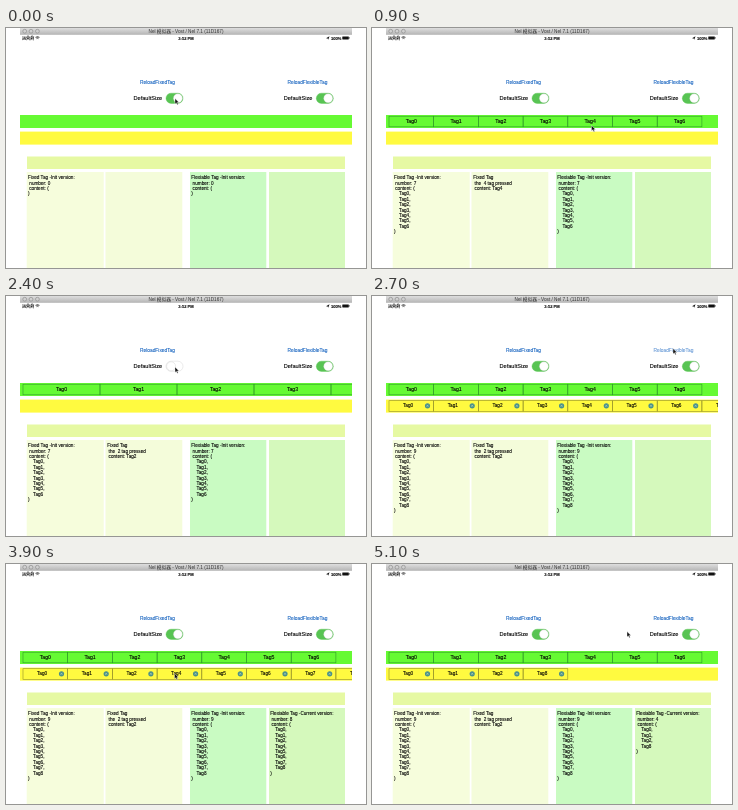
Write an HTML page that moves like this. It is 360 px wide and 240 px high and loops after 5.4 s.

```html
<!DOCTYPE html>
<html lang="zh">
<head>
<meta charset="utf-8">
<title>Tag demo</title>
<style>
html, body { margin: 0; width: 100%; height: 100%; overflow: hidden; background: #fff; }
svg { display: block; }
#stage { width: 360px; height: 240px; }
text { font-family: "Liberation Sans", "Noto Sans CJK SC", "Noto Sans CJK", sans-serif; white-space: pre; fill: #000; stroke: #000; stroke-width: .1px; }
</style>
</head>
<body>
<svg id="stage" viewBox="0 0 360 240" xmlns="http://www.w3.org/2000/svg">
  <defs>
    <linearGradient id="chrome" x2="0" y2="1">
      <stop offset="0" stop-color="#dedede"/>
      <stop offset="1" stop-color="#b4b4b4"/>
    </linearGradient>
  </defs>
  <g id="base"></g>
  <g id="live"></g>
  <g id="cursor">
    <path d="M0 0V5.4L1.3 4.3L2.2 6.3L3.2 5.9L2.3 3.9H4Z" fill="#111" stroke="#fff" stroke-width=".4"/>
  </g>
</svg>
<script>
const STEP = 300, STEPS = 18;
const NARROW = 44.7, WIDE = 77;
const byId = id => document.getElementById(id);

const rect = (x, y, w, h, fill, more = '') =>
  `<rect x="${x}" y="${y}" width="${w}" height="${h}" fill="${fill}" ${more}/>`;
const text = (x, y, size, str, more = '') =>
  `<text x="${x}" y="${y}" font-size="${size}" ${more}>${str}</text>`;
const MID = 'text-anchor="middle"';

// Pointer tip at each step
const pointer = [
  [169, 70.5], [152, 54], [190, 78], [219.5, 97.5], [169, 71], [187, 87],
  [199, 94.5], [150, 94.5], [169, 71], [301, 52.5], [310, 63], [315, 71],
  [240, 92], [168.5, 109.5], [168.5, 109.5], [168.5, 109.5], [168.5, 109.5], [255, 67.5]
];

function drawBase() {
  const lights = [18.7, 25, 31.4].map(x =>
    `<circle cx="${x}" cy="3.2" r="1.9" fill="#d0d0d0" stroke="#777" stroke-width=".5"/>`).join('');
  const wifi = [1, 2, 3].map(r =>
    `<path d="M${31.5 - r * .7} ${11.5 - r * .7}Q31.5 ${11.2 - r * 1.2} ${31.5 + r * .7} ${11.5 - r * .7}"
      fill="none" stroke="#111" stroke-width=".6"/>`).join('');
  byId('base').innerHTML =
    rect(14, 0, 332, 6.8, 'url(#chrome)') + lights +
    text(180, 4.6, 4.7, 'Nel 模拟器 - Vost / Nel 7.1 (11D167)', MID + ' style="fill:#333;stroke:none"') +
    text(16, 11.6, 4.1, '运营商') + wifi +
    text(180, 11.6, 4.1, '3:52 PM', MID + ' font-weight="bold"') +
    '<path d="M320 10.2L323.5 8.2L322.2 11.8L321.7 10.4Z" fill="#111"/>' +
    text(325, 11.6, 4.1, '100%', 'font-weight="bold"') +
    rect(336.3, 8.4, 6.5, 3, '#111', 'rx=".4"') + rect(343, 9.3, .6, 1.2, '#111') +
    rect(14, 87, 332, 13, '#66fa33') +
    rect(14, 103.6, 332, 13, '#fffa40') +
    rect(21, 128.5, 318, 12.5, '#e6f9a3') +
    rect(20.7, 144, 77, 96, '#f6fddc') +
    rect(99.5, 144, 76.8, 96, '#f4fcda') +
    rect(184, 144, 76.3, 96, '#c9fbc2') +
    rect(263, 144, 76, 96, '#d5f9bc') +
    text(127.5, 72, 5.6, 'DefaultSize') + text(277.7, 72, 5.6, 'DefaultSize');
}

// pos: 1 = on, 0 = off, 0.5 = held midway
function toggle(x, pos) {
  const held = pos === .5;
  const track = held ? '#a9c6aa' : pos ? '#58c453' : '#fff';
  const edge = pos === 0 ? '#ccc' : track;
  const w = held ? 11 : 9;
  const knobX = x + .6 + (15.8 - w) * pos;
  return rect(x, 65.2, 17, 10.2, track, `rx="5.1" stroke="${edge}" stroke-width=".4"`) +
    rect(knobX, 65.8, w, 9, '#fff', 'rx="4.5" stroke="#bbb" stroke-width=".3"');
}

function link(x, label, pressed) {
  return text(x, 56, 4.85, label, `style="fill:#1764c0;stroke:#1764c0;opacity:${pressed ? .65 : 1}"`);
}

const bar = (y, body) => `<svg x="14" y="${y}" width="332" height="13" overflow="hidden">${body}</svg>`;

function fixedTags(count, w, scroll) {
  let out = '';
  for (let i = 0; i < count; i++) {
    const x = 3 + i * w - scroll;
    out += rect(x, 1.2, w, 10.6, 'none', 'stroke="#2f9a2a" stroke-width=".6"') +
      text(x + w / 2, 8.2, 5.2, 'Tag' + i, MID);
  }
  return bar(87, out);
}

function flexTags(ids, w) {
  return bar(103.6, ids.map((id, i) => {
    const x = 3 + i * w, cx = x + w - 6.2;
    return rect(x, 1.1, w, 10.8, 'none', 'stroke="#928f2a" stroke-width=".6"') +
      text(x + w * .427, 7.8, 4.7, 'Tag' + id, MID) +
      `<circle cx="${cx}" cy="6.2" r="2.6" fill="#4a918a"/>` +
      `<path d="M${cx - 1} 5.2l2 2m0 -2l-2 2" stroke="#d5e5c0" stroke-width=".5"/>`;
  }).join(''));
}

const lines = (x, rows) => rows.map((row, i) => text(x, 151.1 + i * 5.42, 4.66, row)).join('');

function listing(x, title, ids) {
  return lines(x, [title, ' number: ' + ids.length, ' content: (',
    ...ids.map((id, i) => '    Tag' + id + (i < ids.length - 1 ? ',' : '')), ')']);
}

const range = n => Array.from({ length: n }, (_, i) => i);

function draw(k) {
  const total = k < 1 ? 0 : k < 9 ? 7 : 9;
  const fixedOn = k < 4 || k >= 9;
  const flexPos = k === 11 ? .5 : 1;
  const removed = Math.max(0, k - 12);
  const left = range(9).filter(id => id < 3 || id >= 3 + removed);
  let out = link(134, 'ReloadFixedTag', k === 1) + link(281.5, 'ReloadFlexibleTag', k === 9) +
    toggle(160, fixedOn ? 1 : 0) + toggle(310.3, flexPos);

  if (total) out += fixedTags(7, fixedOn ? NARROW : WIDE, k === 7 ? 50 : 0);
  if (k >= 9) out += flexTags(left, k === 11 ? WIDE : NARROW);

  out += listing(22, 'Fixed Tag -Init version:', range(total)) +
    listing(185.3, 'Flexiable Tag -Init version:', range(total));
  if (k >= 3) {
    const hit = k < 6 ? 4 : 2;
    out += lines(101.3, ['Fixed Tag', ` the  ${hit} tag pressed`, ' content: Tag' + hit]);
  }
  if (removed) out += listing(264.2, 'Flexiable Tag -Current version:', left);

  byId('live').innerHTML = out;
  byId('cursor').setAttribute('transform', `translate(${pointer[k]})`);
}

let shown = -1;
const start = performance.now();
function tick() {
  const t = Math.max(0, performance.now() - start);
  const k = Math.floor(t / STEP) % STEPS;
  if (k !== shown) draw(shown = k);
  requestAnimationFrame(tick);
}
drawBase();
tick();
</script>
</body>
</html>
```
